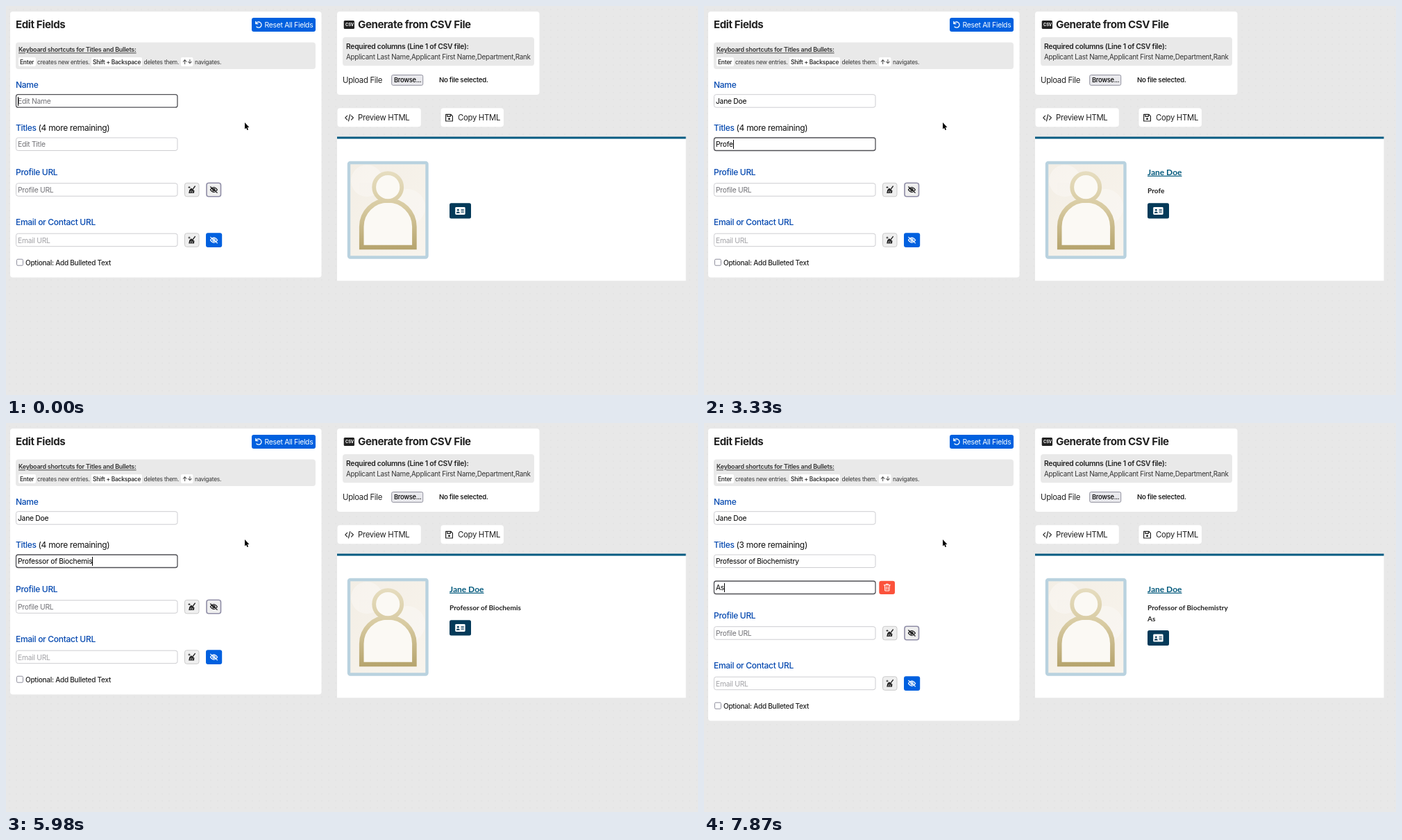
An HTML page that plays this animation: 997x561 px, repeating every 8000 ms.

```html
<!DOCTYPE html>
<html lang="en">
<head>
<meta charset="utf-8">
<title>Profile card editor</title>
<style>
  html, body { margin: 0; width: 100%; height: 100%; overflow: hidden; background: #e8e8e8; }
  svg { display: block; width: 100%; height: 100%; }
  text { font: 10.35px Inter, sans-serif; letter-spacing: -.027em; fill: #222; white-space: pre; }
  .heading { font-size: 15.1px; font-weight: 700; }
  .label { font-size: 12.05px; font-weight: 500; fill: #0549b0; }
  .label tspan { font-weight: 400; fill: #111; }
  .button { font-size: 11.35px; }
  .hint { font-size: 8.4px; fill: #333; }
  .bold { font-weight: 600; }
  .value { fill: #000; }
  .value.empty { fill: #717176; }
  .value.disabled { fill: #a2a2a6; }
  .panel { fill: #fff; rx: 4px; }
  .inset { fill: #e9e9e9; rx: 4px; }
  .key { fill: #fff; rx: 2px; }
  .field { x: 14.5px; width: 232.5px; height: 18.5px; rx: 3px; fill: #fff; stroke: #cdcdd1; }
  .field.focus { stroke: #505055; stroke-width: 1.3; }
  .tool { width: 20.5px; height: 19.5px; rx: 3px; fill: #efefef; stroke: #cbcbcb; }
  .card-text { font-family: Lato, sans-serif; font-size: 10.1px; font-weight: 700; letter-spacing: 0; }
  .card-name { font-size: 12px; fill: #045a7d; text-decoration: underline; }
  .line { fill: none; stroke-linecap: round; stroke-linejoin: round; }
</style>
</head>
<body>
<svg viewBox="0 0 997 561" preserveAspectRatio="none">
  <defs>
    <pattern id="dots" width="10" height="10" patternUnits="userSpaceOnUse">
      <circle cx="5" cy="5" r=".8" fill="#e0e0e0"/>
    </pattern>
    <linearGradient id="gold" gradientUnits="userSpaceOnUse" x1="0" y1="238" x2="0" y2="352">
      <stop offset="0" stop-color="#e6ddc0"/>
      <stop offset=".45" stop-color="#d8cba2"/>
      <stop offset="1" stop-color="#b5a36c"/>
    </linearGradient>
    <linearGradient id="cream" x2="1" y2="1">
      <stop offset="0" stop-color="#f3eee5"/>
      <stop offset="1" stop-color="#f8f4ed"/>
    </linearGradient>
    <g id="eye-off" class="line" stroke="currentColor" stroke-width="1.2">
      <path d="M-5 0Q0-7 5 0Q0 7-5 0ZM-4.8-4.2 4.8 4.2"/>
      <circle r="1.7"/>
    </g>
    <g id="broom">
      <path class="line" d="M4.3-5 1.2-.9" stroke="#222" stroke-width="1.4"/>
      <path d="M-1.2-2.4 3.4 1.2 3 4.8-4.8 5 -3.8.2Z" fill="#222"/>
      <path class="line" d="M-2.4 3.6-1.2 1.4M.2 3.8 1 2" stroke="#efefef" stroke-width=".8"/>
      <path d="M-4-5v3M-5.5-3.5h3" stroke="#222" stroke-width=".9"/>
    </g>
  </defs>

  <rect width="997" height="561" fill="#e8e8e8"/>
  <rect width="997" height="561" fill="url(#dots)"/>

  <!-- Editor -->
  <rect id="editor" class="panel" x="6" y="8" width="448.5" height="383.5"/>
  <text class="heading" x="14" y="32.3">Edit Fields</text>
  <rect x="354" y="17" width="92" height="20" rx="3" fill="#0060df"/>
  <path class="line" d="M360.3 25.2A4.1 4.1 0 1 1 361 30M359.8 22.4V25.6H363" stroke="#fff" stroke-width="1.3"/>
  <text x="372.5" y="30.6" style="fill:#fff">Reset All Fields</text>

  <rect class="inset" x="14" y="52.5" width="432" height="38.5"/>
  <text class="hint bold" x="18" y="66.4" style="font-size:9px;text-decoration:underline">Keyboard shortcuts for Titles and Bullets:</text>
  <rect class="key" x="18" y="74" width="25" height="13"/>
  <rect class="key" x="123" y="74" width="73" height="13"/>
  <rect class="key" x="252" y="74" width="17.5" height="13"/>
  <text class="hint bold" x="20" y="83.5">Enter</text>
  <text class="hint" x="45" y="83.5">creates new entries.</text>
  <text class="hint bold" x="125" y="83.5">Shift + Backspace</text>
  <text class="hint" x="198.5" y="83.5">deletes them.</text>
  <text class="hint bold" x="254" y="83.5">↑↓</text>
  <text class="hint" x="272" y="83.5">navigates.</text>

  <text class="label" x="14" y="118">Name</text>
  <rect id="nameField" class="field" y="127.7"/>
  <text id="nameValue" class="value" x="17" y="141.2"></text>

  <text class="label" x="14" y="180.4">Titles <tspan id="remaining"></tspan></text>
  <rect id="titleField" class="field" y="190"/>
  <text id="titleValue" class="value" x="17" y="203.3"></text>

  <g id="secondRow">
    <rect id="secondField" class="field focus" y="228"/>
    <text id="secondValue" class="value" x="17" y="241.2"></text>
    <rect x="252.3" y="227.7" width="22.7" height="19.3" rx="3" fill="#fb523b"/>
    <path class="line" d="M259.3 233.7H268.3M262.3 233.3V232.2H265.3V233.3M260.3 234.2 260.8 242H266.8L267.3 234.2M262.6 236V240M265 236V240" stroke="#fff"/>
  </g>

  <g id="lower">
    <text class="label" x="14" y="244.1">Profile URL</text>
    <rect class="field" y="255.7"/>
    <text class="value empty" x="17" y="269.2">Profile URL</text>
    <rect class="tool" x="257.5" y="255.3"/>
    <use href="#broom" x="268" y="265"/>
    <rect class="tool" x="289" y="255.3" style="stroke:#8f8da6;stroke-width:1.6"/>
    <use href="#eye-off" x="299.4" y="265" color="#111"/>

    <text class="label" x="14" y="316.4">Email or Contact URL</text>
    <rect class="field" y="328.2"/>
    <text class="value empty disabled" x="17" y="341.7">Email URL</text>
    <rect class="tool" x="257.5" y="327.8"/>
    <use href="#broom" x="268" y="337.6"/>
    <rect x="288" y="327.3" width="23.2" height="20.7" rx="3" fill="#0060df"/>
    <use href="#eye-off" x="299.5" y="337.6" color="#fff"/>

    <rect x="15.5" y="365.2" width="9" height="9" rx="1.5" fill="#fff" stroke="#8f8f9d"/>
    <text class="label" x="28" y="373.8" style="font-size:10.05px;fill:#222">Optional: Add Bulleted Text</text>
  </g>
  <rect id="caret" width="1" height="13"/>

  <!-- CSV upload -->
  <rect class="panel" x="477" y="8" width="291.5" height="120"/>
  <rect x="486.7" y="21" width="15.3" height="12" rx="1.5" fill="#222"/>
  <text x="489" y="29.3" style="font-size:5.8px;font-weight:700;fill:#fff">CSV</text>
  <text class="heading" x="507" y="32.3">Generate from CSV File</text>
  <rect class="inset" x="485" y="45" width="276" height="41.3"/>
  <text class="bold" x="490" y="62">Required columns (Line 1 of CSV file):</text>
  <text x="490" y="77.3" style="font-size:9.88px;fill:#333">Applicant Last Name,Applicant First Name,Department,Rank</text>
  <text class="button" x="485" y="111">Upload File</text>
  <rect x="555.7" y="99.5" width="45" height="14.8" rx="2" fill="#e9e9ed" stroke="#8f8f9d"/>
  <text x="559" y="110.3" style="font-size:9.3px;font-weight:500;fill:#000">Browse...</text>
  <text class="bold" x="624" y="110.3" style="font-size:9.6px">No file selected.</text>

  <rect class="panel" x="477.5" y="147.3" width="120.3" height="26.9"/>
  <path class="line" d="M491.6 158.3 488.8 161.2 491.6 164.1M497.6 158.3 500.4 161.2 497.6 164.1M495.7 156.6 493.5 165.8" stroke="#222" stroke-width="1.2"/>
  <text class="button" x="507" y="165.2">Preview HTML</text>
  <rect class="panel" x="626.5" y="147.3" width="90.5" height="26.9"/>
  <path class="line" d="M633.6 156.4H641L643.4 158.8V166H633.6ZM635.8 156.6V159.4H640.3V156.6" stroke="#222" stroke-width="1.2"/>
  <circle cx="638.5" cy="162.7" r="1.5" fill="#222"/>
  <text class="button" x="651" y="165.2">Copy HTML</text>

  <!-- Card preview -->
  <rect x="477" y="190" width="502.5" height="206.3" fill="#fff"/>
  <rect x="477" y="188.5" width="502.5" height="3" fill="#045b82"/>
  <rect x="494" y="226" width="112.5" height="136.5" rx="2" fill="url(#cream)" stroke="#b9d2df" stroke-width="4.4"/>
  <g fill="#fff" opacity=".3">
    <circle cx="520" cy="252" r="23"/>
    <circle cx="578" cy="290" r="26"/>
  </g>
  <g stroke="url(#gold)" fill="#fbf9f4">
    <path d="M512.2 348V318.3A38.1 38.1 0 0 1 588.4 318.3V348Z" stroke-width="6.6"/>
    <circle cx="550.2" cy="261.2" r="20" stroke-width="5.8"/>
  </g>
  <text id="cardName" class="card-text card-name" x="639" y="243.7"></text>
  <text id="cardTitle" class="card-text" x="639" y="270.3"></text>
  <text id="cardSecond" class="card-text" x="639" y="285.6"></text>
  <g id="badge">
    <rect x="639" y="284.3" width="31" height="22.2" rx="2.5" fill="#043a59"/>
    <rect x="647.2" y="290" width="14.4" height="11" rx="1.4" fill="#fff"/>
    <g fill="#043a59">
      <circle cx="651.3" cy="294.2" r="1.4"/>
      <path d="M648.8 298.8A2.5 2.4 0 0 1 653.8 298.8ZM655.5 293h4.3v1h-4.3ZM655.5 295.1h4.3v1h-4.3ZM655.5 297.2h4.3v1h-4.3Z"/>
    </g>
  </g>

  <path d="M344 168V177.6L346.1 175.7 347.5 178.9 349.1 178.2 347.7 175.1H350.4Z" fill="#000" stroke="#fff" stroke-width=".8" paint-order="stroke"/>
</svg>
<script>
const LOOP = 8000, TITLE_FOCUS = 1840, SECOND_ROW = 7400, ROW_HEIGHT = 38;
const $ = id => document.getElementById(id);

// One key time (ms) per character.
const fields = {
  name: {
    text: 'Jane Doe', hint: 'Edit Name', card: 'cardName', caretY: 131,
    keys: [830, 1010, 1070, 1180, 1240, 1420, 1480, 1600]
  },
  title: {
    text: 'Professor of Biochemistry', hint: 'Edit Title', card: 'cardTitle', caretY: 193,
    keys: [2500, 2850, 3150, 3210, 3330, 3440, 3560, 3680, 3800, 3920, 4160, 4330, 4390,
           4920, 5160, 5340, 5400, 5510, 5750, 5810, 5920, 5980, 6090, 6270, 6380]
  },
  second: {
    text: 'As', hint: 'Edit Title', card: 'cardSecond', caretY: 231,
    keys: [7700, 7870]
  }
};
const caretHidden = [[170, 770], [2440, 2500], [6920, SECOND_ROW]];

function setText(element, text) {
  if (element.textContent !== text) element.textContent = text;
}

function draw(t) {
  const hasSecond = t >= SECOND_ROW;
  const focused = hasSecond ? 'second' : t >= TITLE_FOCUS ? 'title' : 'name';
  const shift = hasSecond ? ROW_HEIGHT : 0;

  $('editor').setAttribute('height', 383.5 + shift);
  $('lower').setAttribute('transform', `translate(0 ${shift})`);
  $('badge').setAttribute('transform', `translate(0 ${hasSecond ? 14.6 : 0})`);
  $('secondRow').style.display = hasSecond ? '' : 'none';
  setText($('remaining'), `(${hasSecond ? 3 : 4} more remaining)`);

  for (const [id, field] of Object.entries(fields)) {
    const typed = field.text.slice(0, field.keys.filter(key => key <= t).length);
    const value = $(id + 'Value');
    setText(value, typed || field.hint);
    value.classList.toggle('empty', !typed);
    setText($(field.card), typed);
    $(id + 'Field').classList.toggle('focus', id === focused);
    if (id === focused) {
      const width = typed ? value.getComputedTextLength() : 0;
      $('caret').setAttribute('x', Math.round(17 + width));
      $('caret').setAttribute('y', field.caretY);
    }
  }
  const hidden = caretHidden.some(([from, to]) => t >= from && t < to);
  $('caret').style.display = hidden ? 'none' : '';
}

const start = performance.now();
function tick() {
  draw((performance.now() - start) % LOOP);
  requestAnimationFrame(tick);
}
tick();
</script>
</body>
</html>
```
